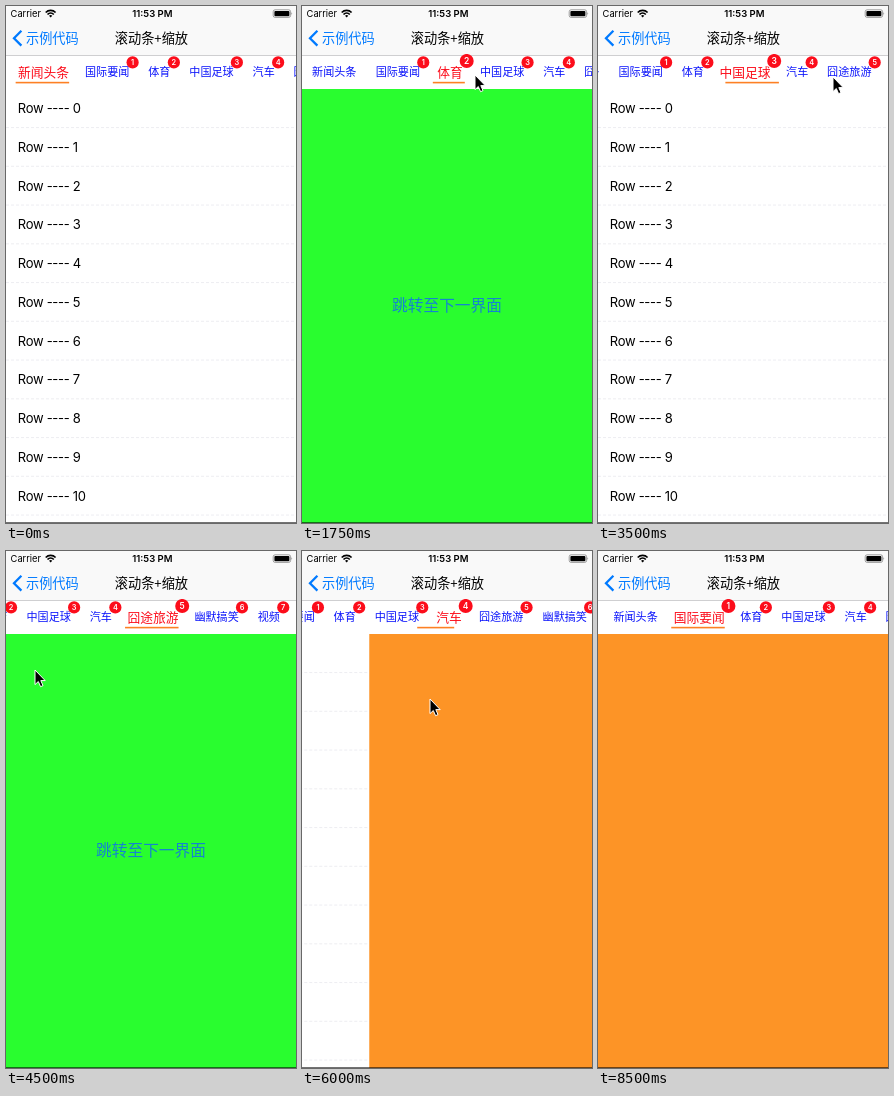
Animation of 290 by 517 pixels, one loop 9 s. Source, as an HTML page:

```html
<!DOCTYPE html>
<html lang="zh-CN">
<head>
<meta charset="utf-8">
<title>滚动条+缩放</title>
<style>
  html, body { margin: 0; width: 100%; height: 100%; overflow: hidden; background: #fff; }
  svg { display: block; width: 290px; height: 517px; }
  text { font-family: Inter, "Noto Sans CJK SC", "Noto Sans CJK", sans-serif; }
  .cjk { font-family: "Noto Sans CJK SC", "Noto Sans CJK", sans-serif; }
  .mid { text-anchor: middle; }
  .row { font-size: 13px; letter-spacing: -.3px; }
  .tab { font-size: 11.1px; }
  .num { font-size: 7.4px; font-weight: 600; fill: #fff; }
  .link { font-size: 15.7px; fill: #1484d0; }
</style>
</head>
<body>
<svg viewBox="0 0 290 517">
  <defs>
    <clipPath id="body"><rect y="83" width="290" height="434"/></clipPath>
    <clipPath id="strip"><rect y="48" width="290" height="35"/></clipPath>
  </defs>
  <rect width="290" height="517" fill="#fff"/>
  <g clip-path="url(#body)">
    <g id="pages"></g>
    <rect id="thumb" x="285.4" width="2.3" height="162" rx="1.1" opacity=".35"/>
  </g>
  <rect width="290" height="49" fill="#f9f9f9"/>
  <rect y="49" width="290" height=".8" fill="#c4c4c6"/>
  <text x="4.6" y="10.9" font-size="9.3">Carrier</text>
  <path d="M39.7 6.5a7 7 0 0 1 9.9 0M41.5 8.5a4.5 4.5 0 0 1 6.3 0" fill="none" stroke="#000" stroke-width="1.7"/>
  <path d="M44.65 11.6l-1.6-1.9a2.4 2.4 0 0 1 3.2 0z"/>
  <text class="mid" x="146.4" y="10.9" font-size="9.5" font-weight="600">11:53 PM</text>
  <rect x="267.2" y="3.8" width="17.4" height="7.6" rx="1.9" fill="none" stroke="#777" stroke-width=".7"/>
  <rect x="268.4" y="5" width="15" height="5.2" rx=".9"/>
  <path d="M285.5 6.3q1.4 1.3 0 2.6z" fill="#777"/>
  <path d="M15.4 24.8L8 32.2l7.4 7.4" fill="none" stroke="#007aff" stroke-width="2.3"/>
  <text class="cjk" x="20" y="36.9" font-size="13.2" fill="#007aff">示例代码</text>
  <text class="cjk mid" x="145.4" y="36.9" font-size="13.2" font-weight="500">滚动条+缩放</text>
  <g id="tabs" clip-path="url(#strip)"></g>
  <rect id="line" y="75.8" height="1.6" fill="#fd8024"/>
  <rect y="516" width="290" height="1" opacity=".55"/>
  <path id="cursor" d="M0 0V14.6L3.3 11.5 5.6 16.7 8 15.6 5.8 10.6H10.2Z" stroke="#fff"/>
</svg>
<script>
const LOOP = 9000, STEP = 250, W = 290, TOP = 83, VIEW = 434, ROW = 38.75, ROWS = 30;
const TAP = 250, SWIPE = 800;
const names = ['新闻头条', '国际要闻', '体育', '中国足球', '汽车', '囧途旅游', '幽默搞笑', '视频'];
const fills = ['#fff', '#fd9426', '#29fd2f'];

// Each move opens another page, by a tap on its tab or a swipe
const moves = [
  { start: 1480, to: 2, tap: true }, { start: 2250, to: 3 },
  { start: 3480, to: 5, tap: true }, { start: 4500, to: 4 },
  { start: 5750, to: 3 }, { start: 7230, to: 1, tap: true }
];
// Pointer stops: time, x, y
const stops = [[250, 190, 400], [1750, 173, 69], [2250, 220, 180], [2800, 100, 180], [3500, 235, 71],
  [4500, 29, 119], [5100, 150, 130], [5750, 70, 147], [6250, 186, 149], [7250, 25, 69], [7750, 12, 18]];

const $ = id => document.getElementById(id);
const clamp = v => Math.min(1, Math.max(0, v));
const mix = (a, b, k) => a + (b - a) * k;
const smooth = k => k * k * (3 - 2 * k);
const easeOut = k => 1 - (1 - k) ** 2;
const move = (el, x, y, s = 1) => el.setAttribute('transform', `translate(${x} ${y}) scale(${s})`);
const show = (el, on) => { el.style.display = on ? '' : 'none'; };

function add(parent, tag, attrs, text = '') {
  const el = document.createElementNS('http://www.w3.org/2000/svg', tag);
  for (const k in attrs) el.setAttribute(k, attrs[k]);
  el.textContent = text;
  return parent.appendChild(el);
}

function addRows(g) {
  for (let r = 0; r < ROWS; r++) {
    const y = TOP + r * ROW, end = y + ROW - .2;
    add(g, 'text', { class: 'row', x: 11.8, y: y + 24.2 }, 'Row ---- ' + r);
    add(g, 'path', { d: `M0 ${end}H${W}`, stroke: '#e9e9ee', 'stroke-width': .8, 'stroke-dasharray': '3 2' });
  }
}

const pages = [0, 1, 2, 3, 4, 5].map(i => {
  const g = add($('pages'), 'g'), kind = i % 3;
  add(g, 'rect', { y: TOP, width: W, height: VIEW, fill: fills[kind] });
  const rows = add(g, 'g');
  if (kind === 0) addRows(rows);
  if (kind === 2) add(g, 'text', { class: 'cjk link mid', x: 145, y: 305.4 }, '跳转至下一界面');
  return { g, rows };
});

let edge = 5.8;
const tabs = names.map((name, i) => {
  const wide = name.length === 4, slot = wide ? 63.6 : 40.7, bx = wide ? 25.4 : 14.5;
  const x = edge + slot / 2;
  edge += slot;
  const g = add($('tabs'), 'g');
  const label = add(g, 'text', { class: 'cjk tab mid', y: 4.2 }, name);
  if (i) {
    add(g, 'circle', { cx: bx, cy: -9.6, r: 6.1, fill: '#fc0d1b' });
    add(g, 'text', { class: 'num mid', x: bx, y: -6.9 }, i);
  }
  return { g, label, x, line: wide ? 53.5 : 32, scroll: Math.max(0, x - 147) };
});

// Page position, tab bar scroll and underline after all moves so far
function stateAt(t) {
  let page = 0, bar = 0, from = tabs[0], mid = from.x, width = from.line;
  for (const m of moves) {
    if (t < m.start) break;
    const to = tabs[m.to], age = t - m.start;
    const k = m.tap ? clamp(age / TAP) : smooth(clamp(age / SWIPE));
    page = mix(page, m.to, m.tap ? Math.floor(k) : k);
    bar += (to.scroll - from.scroll) * easeOut(clamp((age - (m.tap ? 30 : SWIPE / 2)) / 400));
    mid = mix(from.x, to.x, k);
    width = mix(from.line, to.line, k);
    from = to;
  }
  return { page, bar, mid, width };
}

function pointerAt(t) {
  const i = Math.max(1, stops.findIndex(s => s[0] >= t));
  const a = stops[i - 1], b = stops[i];
  const k = smooth(clamp((t - a[0]) / (b[0] - a[0])));
  return [mix(a[1], b[1], k), mix(a[2], b[2], k)];
}

function draw(t) {
  const { page, bar, mid, width } = stateAt(t);

  pages.forEach((p, i) => {
    show(p.g, Math.abs(i - page) < 1);
    move(p.g, (i - page) * W, 0);
  });
  const scroll = 330 * easeOut(clamp((t - 250) / 1000));
  move(pages[0].rows, 0, -scroll);
  $('thumb').setAttribute('y', TOP + 2 + scroll * VIEW / (ROWS * ROW));
  show($('thumb'), t > 250 && t <= 1250);

  tabs.forEach((tab, i) => {
    const on = i === Math.round(page);
    move(tab.g, tab.x - bar, 66, on ? 1.15 : 1);
    tab.label.setAttribute('fill', on ? '#fc0d1b' : '#0b14fb');
  });
  $('line').setAttribute('x', mid - bar - 1.2 - width / 2);
  $('line').setAttribute('width', width);

  show($('cursor'), t >= 250 && t <= 7750);
  move($('cursor'), ...pointerAt(t));
}

const start = performance.now();
function tick() {
  const t = (performance.now() - start) % LOOP;
  draw(Math.floor(t / STEP) * STEP);
  requestAnimationFrame(tick);
}
tick();
</script>
</body>
</html>
```
